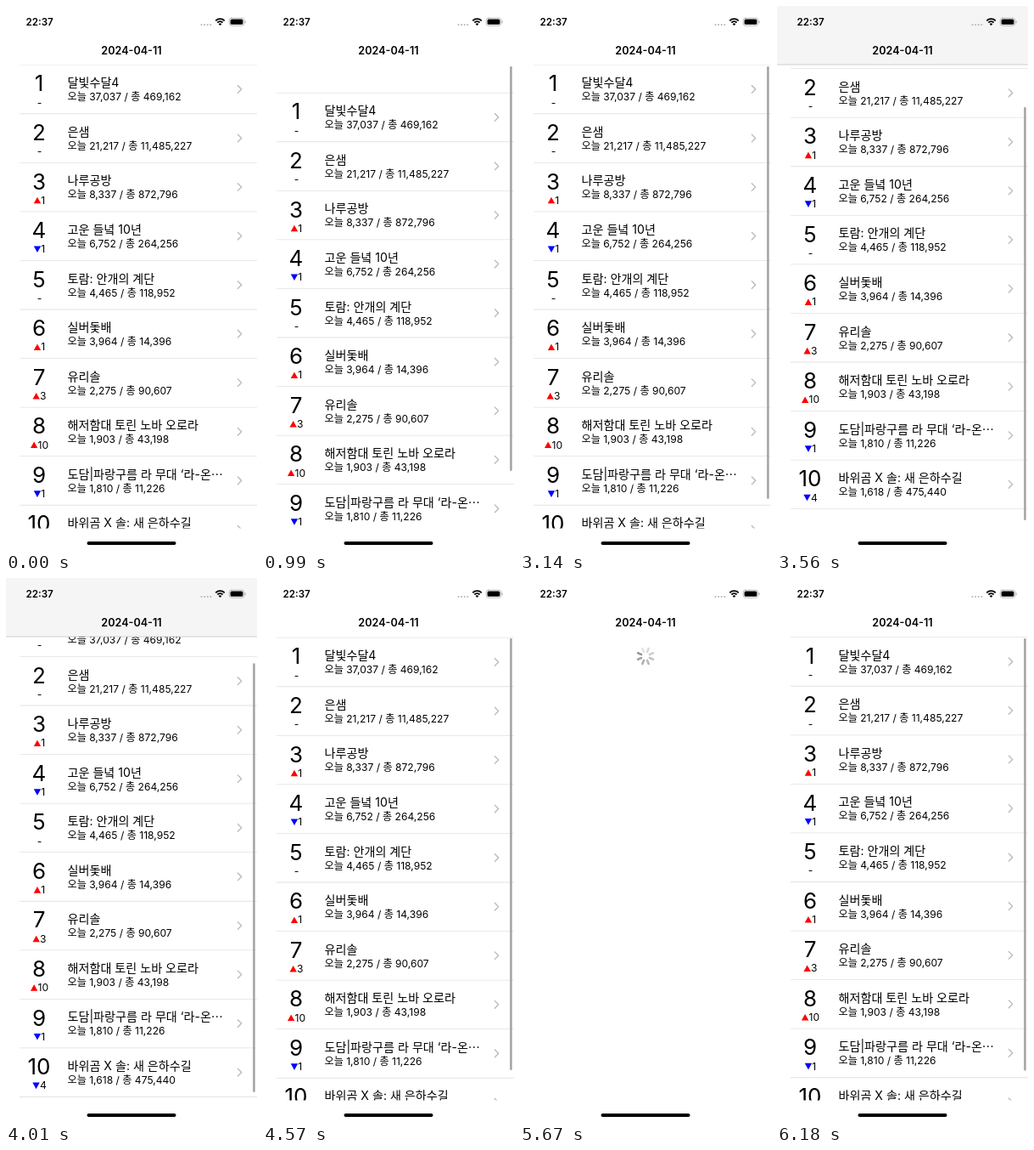
Animation of 296 by 640 pixels, one loop 6.88 s. Source, as an HTML page with a canvas:

```html
<!DOCTYPE html>
<html lang="ko">
<head>
<meta charset="utf-8">
<style>
html, body { margin: 0; width: 100%; height: 100%; overflow: hidden; background: #fff; }
canvas { display: block; width: 296px; height: 640px; }
</style>
</head>
<body>
<canvas id="stage"></canvas>
<script>
const W = 296, H = 640, LOOP = 6880;
const TOP = 69, BOTTOM = 614.5, ROW = 57.56;
const FONT = 'Inter, "Noto Sans CJK KR", "Noto Sans CJK", sans-serif';

// title, today, total, change of rank
const films = [
  ['달빛수달4', '37,037', '469,162', 0],
  ['은샘', '21,217', '11,485,227', 0],
  ['나루공방', '8,337', '872,796', 1],
  ['고운 들녘 10년', '6,752', '264,256', -1],
  ['토람: 안개의 계단', '4,465', '118,952', 0],
  ['실버돛배', '3,964', '14,396', 1],
  ['유리솔', '2,275', '90,607', 3],
  ['해저함대 토린 노바 오로라', '1,903', '43,198', 10],
  ['도담|파랑구름 라 무대 ‘라-온⋯', '1,810', '11,226', -1],
  ['바위곰 X 솔: 새 은하수길', '1,618', '475,440', -4]
];

const smooth = u => u * u * (3 - 2 * u);
const settle = u => 1 - (1 - u) ** 3;

// time, scroll offset, easing towards that key
const scrollKeys = [
  [0, 0], [660, 0], [1440, -85], [2100, -45], [2430, 0, settle],
  [3140, 0], [3620, 54.5], [4150, 30], [4551, -1],
  [5210, -85], [5780, -45], [6180, -0.5, settle], [LOOP, -0.5]
];
const reloads = [[1500, 2100], [5300, 5780]];

const canvas = document.getElementById('stage');
const dpr = window.devicePixelRatio || 1;
canvas.width = W * dpr;
canvas.height = H * dpr;
const ctx = canvas.getContext('2d');
ctx.scale(dpr, dpr);

// The screen refreshes about nine times a second while it moves.
function hold(t) {
  const tick = (start, lead, step, last) =>
    start + step * Math.max(0, Math.min(last, Math.floor((t - start + lead) / step)));
  if (t < 770) return 0;
  return t < 3140 ? tick(770, 4, 110.67, 15) : tick(3140, 14, 108.57, 28);
}

function scrollAt(t) {
  const i = Math.max(1, scrollKeys.findIndex(k => k[0] >= t));
  const [t0, a] = scrollKeys[i - 1], [t1, b, ease = smooth] = scrollKeys[i];
  return a + (b - a) * ease((t - t0) / (t1 - t0));
}

function text(str, x, y, size, align = 'left', weight = 400) {
  ctx.font = `${weight} ${size}px ${FONT}`;
  ctx.textAlign = align;
  ctx.fillText(str, x, y);
}

function rect(x, y, w, h, color, r = 0) {
  ctx.fillStyle = color;
  ctx.beginPath();
  ctx.roundRect(x, y, w, h, r);
  ctx.fill();
}

function line(points, color, width) {
  ctx.strokeStyle = color;
  ctx.lineWidth = width;
  ctx.beginPath();
  points.forEach(p => ctx.lineTo(...p));
  ctx.stroke();
}

function drawChange(n, y) {
  if (!n) return text('-', 39.5, y + 48.6, 12.1, 'center');
  const label = String(Math.abs(n)), size = 12.1, tri = 8.6;
  ctx.font = `400 ${size}px ${FONT}`;
  const x = 39.5 - (tri + ctx.measureText(label).width) / 2;
  text(label, x + tri, y + 48.6, size);
  const [tip, base] = n > 0 ? [40.6, 48.2] : [48.4, 40.8];
  ctx.fillStyle = n > 0 ? '#f00' : '#00f';
  ctx.beginPath();
  ctx.moveTo(x, y + base);
  ctx.lineTo(x + 8.4, y + base);
  ctx.lineTo(x + 4.2, y + tip);
  ctx.fill();
}

function drawRow([title, today, total, change], i, y) {
  ctx.fillStyle = '#000';
  text(i + 1, 39, y + 31.4, 26, 'center');
  text(title, 72.5, y + 26.3, 14.1);
  text(`오늘 ${today} / 총 ${total}`, 72.5, y + 42.3, 12.1);
  drawChange(change, y);
  line([[273.4, y + 24.6], [277.7, y + 28.9], [273.4, y + 33.2]], '#c0c0c0', 1.5);
  rect(16, y + ROW - 0.2, W - 16, 0.8, '#e2e2e2');
}

function drawList(off) {
  const y = TOP - off;
  rect(0, y, W, H, '#fff');
  rect(16, y - 0.2, W - 16, 0.8, '#e2e2e2');
  films.forEach((f, i) => drawRow(f, i, y + i * ROW));
}

function drawBar(off) {
  const slide = Math.max(0, Math.min(30, off)) * 25 / 30;
  const top = 71 + slide + Math.max(0, off - 30);
  const end = 580 + slide + Math.min(0, off);
  rect(291.2, top, 2.5, end - top, '#a2a2a2', 1.25);
}

function drawSpinner(count, turn, shade) {
  ctx.save();
  ctx.translate(148, 92);
  ctx.rotate(turn * Math.PI / 180);
  for (let i = 0; i < count; i++) {
    const v = shade(i);
    line([[0, -5.3], [0, -9.7]], `rgb(${v},${v},${v})`, 2.6);
    ctx.rotate(Math.PI / 4);
  }
  ctx.restore();
}

function drawHeader(off) {
  const tint = Math.max(0, Math.min(1, off / 12));
  rect(0, 0, W, TOP, '#fff');
  if (tint) {
    ctx.globalAlpha = tint;
    rect(0, 0, W, TOP, '#f5f5f5');
    rect(0, TOP - 0.4, W, 0.8, '#cfcfcf');
    ctx.globalAlpha = 1;
  }
  ctx.fillStyle = '#000';
  text('22:37', 23.5, 23, 11.6, 'left', 600);
  text('2024-04-11', 148, 56.6, 12.6, 'center', 600);

  for (let i = 0; i < 4; i++) rect(229.4 + i * 3.6, 21, 2.2, 2.2, '#bcbcbc', 1.1);

  // wifi
  ctx.strokeStyle = ctx.fillStyle = '#000';
  ctx.lineCap = 'butt';
  ctx.lineWidth = 1.8;
  for (const r of [4.4, 7.4]) {
    ctx.beginPath();
    ctx.arc(252.5, 22.6, r, -Math.PI * 0.75, -Math.PI * 0.25);
    ctx.stroke();
  }
  ctx.beginPath();
  ctx.moveTo(252.5, 23);
  ctx.arc(252.5, 23, 2.6, -Math.PI * 0.75, -Math.PI * 0.25);
  ctx.fill();
  ctx.lineCap = 'round';

  // battery
  ctx.strokeStyle = '#aaa';
  ctx.lineWidth = 0.8;
  ctx.beginPath();
  ctx.roundRect(263.2, 14.2, 17.6, 9, 2.8);
  ctx.stroke();
  rect(264.6, 15.6, 14.8, 6.2, '#000', 1.6);
  rect(281.6, 17.2, 1, 3, '#aaa', 0.5);
}

function draw(t) {
  const off = scrollAt(t);
  const reload = reloads.find(([a, b]) => t >= a && t < b);
  rect(0, 0, W, H, '#fff');
  ctx.lineCap = ctx.lineJoin = 'round';

  ctx.save();
  ctx.beginPath();
  ctx.rect(0, TOP - 0.4, W, BOTTOM - TOP + 0.4);
  ctx.clip();
  if (reload) {
    const age = t - reload[0], head = Math.floor(age / 100) + 3;
    drawSpinner(8, Math.max(0, 500 - age) * 0.1375, i => 152 + (head - i + 16) % 8 * 11);
  } else {
    const spokes = Math.max(0, Math.min(8, Math.floor((-off - 35) / 6)));
    drawSpinner(spokes, 0, () => 176);
    drawList(off);
    if (t >= 770) drawBar(off);
  }
  ctx.restore();

  drawHeader(reload ? 0 : off);
  rect(95.5, 630, 105, 4, '#000', 2);
}

function frame() {
  draw(hold(performance.now() % LOOP));
  requestAnimationFrame(frame);
}
frame();
</script>
</body>
</html>
```
